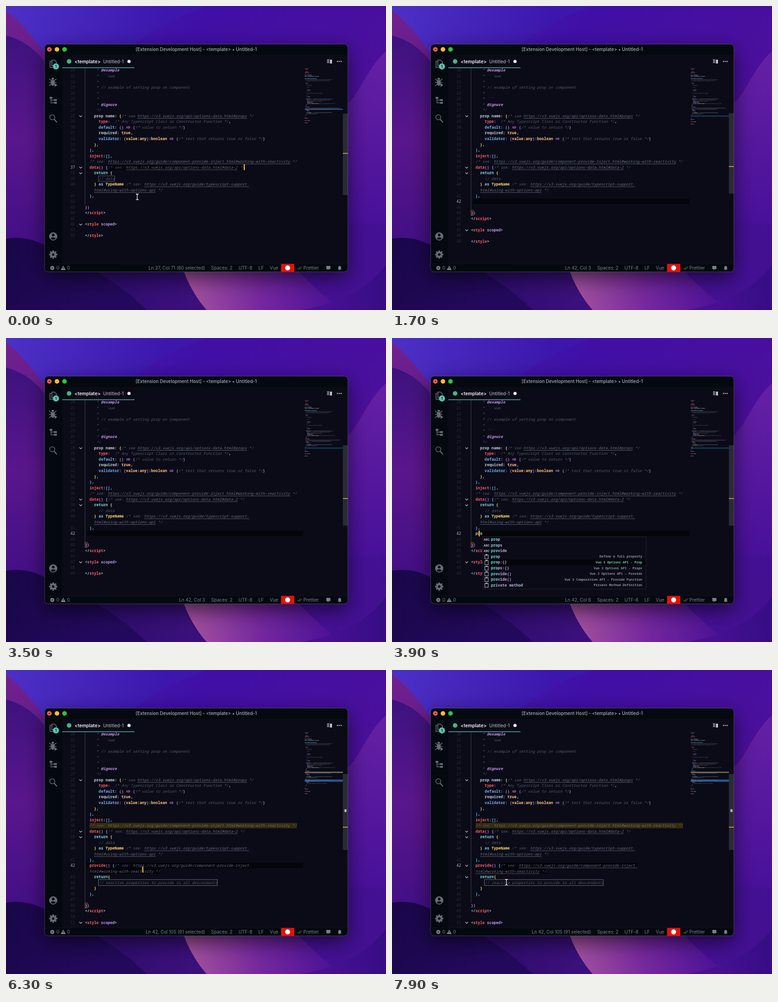
Animation, 837 px wide and 669 px high, one loop 8000 ms. Source, as an HTML page with a canvas:

```html
<!DOCTYPE html>
<html lang="en">
<head>
<meta charset="utf-8">
<title>Snippet editor</title>
<style>
html, body { margin: 0; width: 837px; height: 669px; overflow: hidden; background: #3f10a4; }
canvas { display: block; }
</style>
</head>
<body>
<canvas id="stage" width="837" height="669"></canvas>
<script>
const LOOP = 8000;
const CHAR = 5.02, ROW = 12.55, FIRST = 19;
const MONO = '"Noto Sans Mono", monospace', SANS = 'Inter, sans-serif';
const colX = c => 174 + CHAR * c;
const rowY = i => 141.5 + ROW * (i - FIRST);

// ~x starts a token of kind x; a leading ^ marks a wrapped row without number.
const HEAD = `~t</~rtemplate~t>
  ~t<~rdiv~t>

  ~t</~rdiv~t>
~t</~rtemplate~t>

~t<~rscript ~vlang~t="ts">
~timport ~w{ defineComponent } ~tfrom ~y'vue'

~texport default ~bdefineComponent({
  ~c/* see: https://v3.vuejs.org/guide/component-registration.html#names */
  ~c/* components, directives, mixins and other options go here */

  ~rprops: ~b{
    ~c/**
     ~c* description

     ~c* @type

     ~c* ~v@example
     ~c* \`\`\`vue
     ~c*
     ~c* // example of setting prop on component
     ~c*
     ~c* \`\`\`
     ~c* ~v@ignore
     ~c*/
    ~wprop name: ~y{~c/* see ~uhttps://v3.vuejs.org/api/options-data.html#props~c */
      ~rtype:  ~c/* Any Typescript Class or Constructor Function */~w,
      ~bdefault: ~p() ~a=> ~p(~c/* value to return */~p)
      ~wrequired: ~otrue~w,
      ~bvalidator: ~p(~ovalue:any~p)~t:~oboolean ~a=> ~p(~c/* test that returns true or false */~p)
    ~y}~w,
  ~b}~w,
  ~rinject~t:~b[]~w,
  ~c/* see: ~uhttps://v3.vuejs.org/guide/component-provide-inject.html#working-with-reactivity~c */
  ~rdata~p() ~b{~c/* see: ~uhttps://v3.vuejs.org/api/options-data.html#data-2~c */
    ~treturn ~y{
      ~c// data
    ~y} ~tas ~yTypeName ~c/* see: ~uhttps://v3.vuejs.org/guide/typescript-support.
^    ~uhtml#using-with-options-api~c */
  ~b}~w,`.split('\n');

const TAIL = `
~p})
~t</~rscript~t>

~t<~rstyle ~vscoped~t>

~t</~rstyle~t>`.split('\n');

const PROVIDE = `  ~rprovide~p() ~b{~c/* see: ~uhttps://v3.vuejs.org/guide/component-provide-inject.
^  ~uhtml#working-with-reactivity~c */
    ~treturn~y{
      ~c// reactive properties to provide to all descendants
    ~y}
  ~b}~w,`.split('\n');

const COLORS = {
  t: '#7fdbe6', r: '#ff5d6c', w: '#c3c8d8', y: '#ffd866', b: '#6fb1f0', p: '#d07ce0',
  o: '#ffc285', v: '#c792ea', c: '#565a68', u: '#6a6e7d', a: '#d07ce0'
};

const SUGGESTIONS = {
  pro: ['prop', 'props', 'provide', 'prop|Define a full property', 'prop:{}|Vue 3 Options API - Prop',
    'props:{}|Vue 3 Options API - Props', 'provide()|Vue 3 Options API - Provide',
    'provide()|Vue 3 Composition API - Provide Function', 'private method|Private Method Definition'],
  prov: ['provide', 'provide()|Vue 3 Options API - Provide',
    'provide()|Vue 3 Composition API - Provide Function', 'private method|Private Method Definition']
};

const CLICK = 100, ENTER = 1200, TYPE_PRO = 3850, TYPE_V = 4000, PICK = 4900, ACCEPT = 6200;
const FOLDED = 6600, LINKED = 6900, POINTER = 7600;
const HIDDEN = [[700, 1200], [1700, 2000], [2600, 3000], [3500, 3850], [5300, 5700], [6900, 7400], [7800, 8000]];
// start, end, column, row
const CARET = [
  [0, 1, 70, 36], [CLICK, 500, 4, 41], [ENTER, 1500, 2, 42],
  [TYPE_PRO, 4000, 5, 42], [TYPE_V, 4200, 6, 42], [ACCEPT, 6420, 33.5, 43]
];
const STATUS = [
  [0, 'Ln 37, Col 71 (60 selected)'], [CLICK, 'Ln 41, Col 5'], [ENTER, 'Ln 42, Col 3'],
  [TYPE_PRO, 'Ln 42, Col 6'], [TYPE_V, 'Ln 42, Col 7'], [ACCEPT, 'Ln 42, Col 105 (91 selected)']
];

const screen = document.getElementById('stage').getContext('2d');
let ctx = screen;

function rect(x, y, w, h, fill) {
  ctx.fillStyle = fill;
  ctx.fillRect(x, y, w, h);
}
function frame(x, y, w, h, color) {
  ctx.strokeStyle = color;
  ctx.lineWidth = 1;
  ctx.strokeRect(x, y, w, h);
}
function disc(x, y, r, fill) {
  ctx.fillStyle = fill;
  ctx.beginPath();
  ctx.arc(x, y, r, 0, 7);
  ctx.fill();
}
function line(path, color, width = 1) {
  ctx.strokeStyle = color;
  ctx.lineWidth = width;
  ctx.stroke(new Path2D(path));
}
function shape(path, fill) {
  ctx.fillStyle = fill;
  ctx.fill(new Path2D(path));
}
function text(s, x, y, font, fill, align = 'left') {
  ctx.font = font;
  ctx.fillStyle = fill;
  ctx.textAlign = align;
  ctx.fillText(s, x, y);
}
function gradient(x0, y0, x1, y1, ...stops) {
  const g = ctx.createLinearGradient(x0, y0, x1, y1);
  stops.forEach((c, i) => g.addColorStop(i / (stops.length - 1), c));
  return g;
}

function drawWallpaper() {
  rect(0, 0, 837, 669, gradient(0, 0, 837, 669, '#4527b8', '#400fa6', '#4a0f9c', '#41108f'));
  shape('M0 0H445C390 15 320 50 250 110H85C55 70 30 30 0 10Z', gradient(0, 0, 330, 90, '#4c31c6', '#3d17ad'));
  shape('M0 10C30 30 60 70 90 110V340H0Z', gradient(0, 10, 0, 300, '#73218f', '#4a1685'));
  shape('M0 65C40 75 70 100 90 130V540H0Z', gradient(0, 65, 0, 520, '#3d127f', '#5a168c', '#430f85'));
  shape('M753 215C780 190 800 130 837 100V480H753Z', gradient(790, 110, 790, 480, '#6420a4', '#481099'));
  shape('M85 570H392L442 669H0Z', gradient(85, 600, 420, 640, '#260a62', '#3b107c'));
  shape('M0 512C50 505 75 520 120 545C220 590 270 630 310 669H0Z', gradient(0, 510, 200, 669, '#190748', '#23095c'));
  shape('M392 585C405 620 425 650 442 669H740C700 640 660 600 640 580Z',
    gradient(400, 640, 720, 610, '#a4529e', '#74279e', '#4b1196'));
  shape('M650 669C730 655 795 625 837 570V669Z', gradient(700, 650, 837, 640, '#481093', '#360d85'));
}

function drawActivityBar() {
  const c = '#686c77';
  line('M101 119H107L111 123V131H101ZM101 122H97V135H106', c, 1.6);
  disc(110, 133, 6.8, '#5abfb0');
  text('1', 110, 136, '600 8px ' + SANS, '#0a1118', 'center');
  shape('M99 163H107V173L103 176L99 173ZM100 162A3 4 0 0 1 106 162Z', c);
  line('M95 160L99 164M95 168H99M95 176L99 172M111 160L107 164M107 168H111', c, 1.5);
  shape('M107 170L113 174L107 178Z', c);
  line('M99 204V213H107M99 207H107', c, 1.4);
  [[96, 200], [106, 205], [106, 211]].forEach(([x, y]) => rect(x, y, 6, 4, c));
  ctx.beginPath();
  ctx.arc(102, 245, 5.5, 0, 7);
  ctx.stroke();
  line('M106 249L112 256', c, 2.2);
  disc(104, 507, 9, c);
  disc(104, 504, 3, '#04090f');
  shape('M98.5 512A6 5 0 0 1 109.500 512A8 8 0 0 1 98.5 512Z', '#04090f');
  for (let k = 0; k < 8; k++) {
    const a = k * Math.PI / 4, s = Math.sin(a), q = Math.cos(a);
    line(`M${104 + 5 * q} ${547 + 5 * s}L${104 + 9 * q} ${547 + 9 * s}`, c, 3.6);
  }
  disc(104, 547, 6.8, c);
  disc(104, 547, 2.8, '#04090f');
}

function drawWindow() {
  ctx.save();
  ctx.shadowColor = 'rgba(0,0,0,.6)';
  ctx.shadowBlur = 45;
  ctx.shadowOffsetY = 14;
  ctx.beginPath();
  ctx.roundRect(85, 84, 668, 501, 8);
  ctx.fillStyle = '#04090f';
  ctx.fill();
  ctx.restore();
  rect(124, 108, 629, 459, '#0a0b17');
  ctx.beginPath();
  ctx.roundRect(85, 84, 668, 501, 8);
  ctx.strokeStyle = 'rgba(190,190,215,.3)';
  ctx.lineWidth = 1;
  ctx.stroke();

  ['#ff5f57', '#febc2e', '#28c840'].forEach((c, i) => disc(95.5 + 16.7 * i, 95.5, 5, c));
  disc(95.5, 95.5, 1.6, '#7a100c');
  text('[Extension Development Host] - <template> • Untitled-1', 419, 99.3, '500 10px ' + SANS, '#a9adb9', 'center');

  disc(139, 122, 5, '#41b883');
  text('<template>', 151, 125.5, '600 10.3px ' + SANS, '#f0f1f5');
  text('Untitled-1', 214, 125.5, '10px ' + SANS, '#c2c5ce');
  disc(271, 122, 3.6, '#f0f1f5');
  rect(124, 135, 159, 1.5, '#4fb3a4');
  line('M707 118.500H712M707 121.500H712M707 124.500H712', '#c4c7d0', 1.3);
  rect(713.5, 118, 4.5, 8.5, '#c4c7d0');
  [730, 734, 738].forEach(x => disc(x, 122, 1.3, '#c4c7d0'));

  drawActivityBar();

  const c = '#7b7f8b', status = (s, x) => text(s, x, 579.8, '10px ' + SANS, c);
  rect(85, 567, 668, 1, '#0d121b');
  disc(102, 576.5, 4.5, c);
  line('M100.300 574.800L103.700 578.200M103.700 574.800L100.300 578.200', '#04090f');
  status('0', 111);
  shape('M126 571.500L131.500 581H120.500Z', c);
  rect(125.4, 575, 1.2, 3, '#04090f');
  status('0', 134.5);
  status('Spaces: 2', 452);
  status('UTF-8', 512);
  status('LF', 556);
  status('Vue', 581);
  rect(606, 567.5, 29, 17.5, '#e3120b');
  disc(620.3, 576.3, 5.5, '#ffffff');
  line('M641.500 577L644 579.500L648.500 573.500M646 578.500L647 579.500L652 573.500', c);
  status('Prettier', 655);
  shape('M705.500 572H714.500V579H711L708.500 582V579H705.500Z', c);
  shape('M731 580L732 578V575A3 3 0 0 1 738 575V578L739 580ZM733.500 580.500H736.500L735 582Z', c);
}

function drawTokens(source, i, opt) {
  const parts = source.replace('^', '').split('~');
  const y = rowY(i), visible = i >= FIRST && y < 567;
  let c = parts[0].length;
  parts.slice(1).forEach(part => {
    const kind = part[0], s = part.slice(1), x = colX(c), w = s.length * CHAR;
    const comment = kind === 'c' || kind === 'u', color = COLORS[kind];
    ctx.globalAlpha = 0.6;
    for (const word of s.matchAll(/\S+/g))
      rect(658 + (c + word.index) * 0.84, 136.6 + i * 2.5, word[0].length * 0.84, 1.2, color);
    ctx.globalAlpha = 1;
    if (visible) {
      if (comment && opt.back) rect(x, y - 6, w, 12, opt.back);
      if (kind === 'a') {
        line(`M${x + 0.5} ${y - 1}H${x + 7.5}M${x + 0.5} ${y + 1.300}H${x + 7.5}M${x + 6} ${y - 2.6}L${x + 9} ${y}L${x + 6} ${y + 2.8}`, color);
      } else {
        const style = comment ? 'italic ' : s[0] === '@' ? 'italic 600 ' : '600 ';
        text(opt.dots && comment ? s.replace(/ /g, '·') : s, x, y + 2.9, style + '8.367px ' + MONO, color);
      }
      if (kind === 'u' && !opt.plain) rect(x, y + 5, w, 0.8, color);
    }
    c += s.length;
  });
}

function drawCode(t) {
  const done = t >= ACCEPT;
  const typed = t >= TYPE_V ? 'prov' : t >= TYPE_PRO ? 'pro' : '';
  const middle = done ? PROVIDE : t >= ENTER ? ['  ~w' + typed] : [];
  const lines = [...HEAD, ...middle, ...TAIL];
  const bracketRow = HEAD.length + middle.length + 1;
  const current = t < CLICK ? 36 : t < ENTER ? 41 : 42;

  ctx.save();
  ctx.beginPath();
  ctx.rect(124, 137, 629, 430);
  ctx.clip();
  rect(173.6, 137, 0.9, rowY(bracketRow) - 6 - 137, '#4a4d58');
  if (t >= ENTER && t < LINKED) rect(178, 424, 477, 12, 'rgba(0,0,0,.55)');

  if (done) rect(658, 223.8, 84, 2.6, '#77765c');
  rect(658, 136 + current * 2.5, 84, done ? 5 : 2.4, t < CLICK || done ? '#24558a' : '#123f58');

  let number = 0;
  lines.forEach((source, i) => {
    const selected = t < CLICK ? i === 36 : done && (i === 42 || i === 43);
    const matched = done && i === 35;
    drawTokens(source, i, {
      back: selected ? '#03040b' : matched ? '#352c0d' : '',
      dots: selected,
      plain: matched || done && t < LINKED && (i === 42 || i === 43)
    });
    if (source[0] === '^') return;
    number++;
    if (i < FIRST) return;
    text(number, 152, rowY(i) + 2.9, '8.367px ' + MONO, i === current ? '#b4b8c6' : '#2b2d3a', 'right');
    const folds = /prop name|data~|treturn|style ~/.test(source) && !(done && i === 44)
      || t >= FOLDED && (i === 42 || i === 44);
    if (folds) line(`M161.500 ${rowY(i) - 1}L164.500 ${rowY(i) + 2}L167.500 ${rowY(i) - 1}`, '#c8cbd4', 1.2);
  });

  if (t < CLICK) frame(203.5, rowY(38) - 6, 36, 12, '#565965');
  if (done) frame(203.5, rowY(45) - 6.5, 262, 13, '#6a6d78');
  if (t >= ENTER && t < FOLDED) frame(174, rowY(bracketRow) - 5.5, 4.8, 11, '#8d6a45');

  const [top, height, mark] = done ? [229, 167, 345] : t < ENTER ? [237, 179, 323.5] : [236, 177, 352.5];
  rect(742, top, 11, height, 'rgba(150,155,170,.22)');
  rect(742, mark, 11, 1.6, '#e3b23c');
  if (done) rect(745.5, 306.5, 4.5, 6, '#b9bbc2');
  ctx.restore();
}

function drawSuggestions(t) {
  if (t < TYPE_PRO || t >= ACCEPT) return;
  const query = t < TYPE_V ? 'pro' : 'prov', items = SUGGESTIONS[query];
  const x = query === 'pro' ? 200 : 205, active = query === 'pro' ? 4 : t < PICK ? 1 : 2;
  const height = items.length * ROW + 2;
  rect(x, 437, 359, height, '#0a0b17');
  frame(x + 0.5, 437.5, 359, height, '#20222f');
  items.forEach((item, i) => {
    const [label, detail] = item.split('|'), y = 443.3 + i * ROW;
    if (i === active) rect(x + 1, y - 6, 358, 12, '#02050a');
    if (detail) {
      frame(x + 4.5, y - 3.5, 7.5, 8.5, '#c4c7d0');
      rect(x + 6.5, y - 5, 3.5, 2.5, '#c4c7d0');
      text(detail, x + 351, y + 2.5, '600 7.13px ' + MONO, i === active ? '#63d6a4' : '#8d91a0', 'right');
    } else {
      text('ABC', x + 2, y + 3, '700 6px ' + SANS, '#c4c7d0');
    }
    let hit = 0;
    [...label].forEach((ch, k) => {
      const match = ch === query[hit];
      if (match) hit++;
      text(ch, x + 18 + k * CHAR, y + 2.9, '600 8.367px ' + MONO, match ? '#6fe3d0' : '#c3a9dc');
    });
  });
}

function drawCaret(t) {
  if (HIDDEN.some(([a, b]) => t >= a && t < b)) return;
  const k = CARET.findLastIndex(step => t >= step[0]);
  const [start, end, c, r] = CARET[k], [, , c0, r0] = CARET[Math.max(0, k - 1)];
  const u = Math.min(1, (t - start) / (end - start)), e = 1 - (1 - u) ** 2;
  rect(colX(c0 + (c - c0) * e) - 1.6, rowY(r0 + (r - r0) * e) - 6.4, 2.2, 12.8, '#ffc640');
}

function drawPointer(t) {
  if (t >= ENTER && t < POINTER) return;
  const u = t < ENTER ? 0 : Math.max(0, 1 - (t - POINTER) / 300);
  const x = t < ENTER ? 289 : 252 + 12 * u, y = t < ENTER ? 420 : 467 + 16 * u;
  const beam = `M${x - 3} ${y - 6.5}Q${x} ${y - 6.5} ${x} ${y - 4}V${y + 4}Q${x} ${y + 6.5} ${x + 3} ${y + 6.5}` +
    `M${x + 3} ${y - 6.5}Q${x} ${y - 6.5} ${x} ${y - 4}M${x} ${y + 4}Q${x} ${y + 6.5} ${x - 3} ${y + 6.5}`;
  line(beam, '#000', 2.6);
  line(beam, '#fff', 1.3);
}

const backdrop = document.createElement('canvas');
backdrop.width = 837;
backdrop.height = 669;
ctx = backdrop.getContext('2d');
drawWallpaper();
drawWindow();
ctx = screen;

function draw() {
  const t = performance.now() % LOOP;
  ctx.drawImage(backdrop, 0, 0);
  drawCode(t);
  drawSuggestions(t);
  drawCaret(t);
  drawPointer(t);
  text(STATUS.findLast(s => t >= s[0])[1], 438.5, 579.8, '10px ' + SANS, '#7b7f8b', 'right');
  requestAnimationFrame(draw);
}
draw();
</script>
</body>
</html>
```
